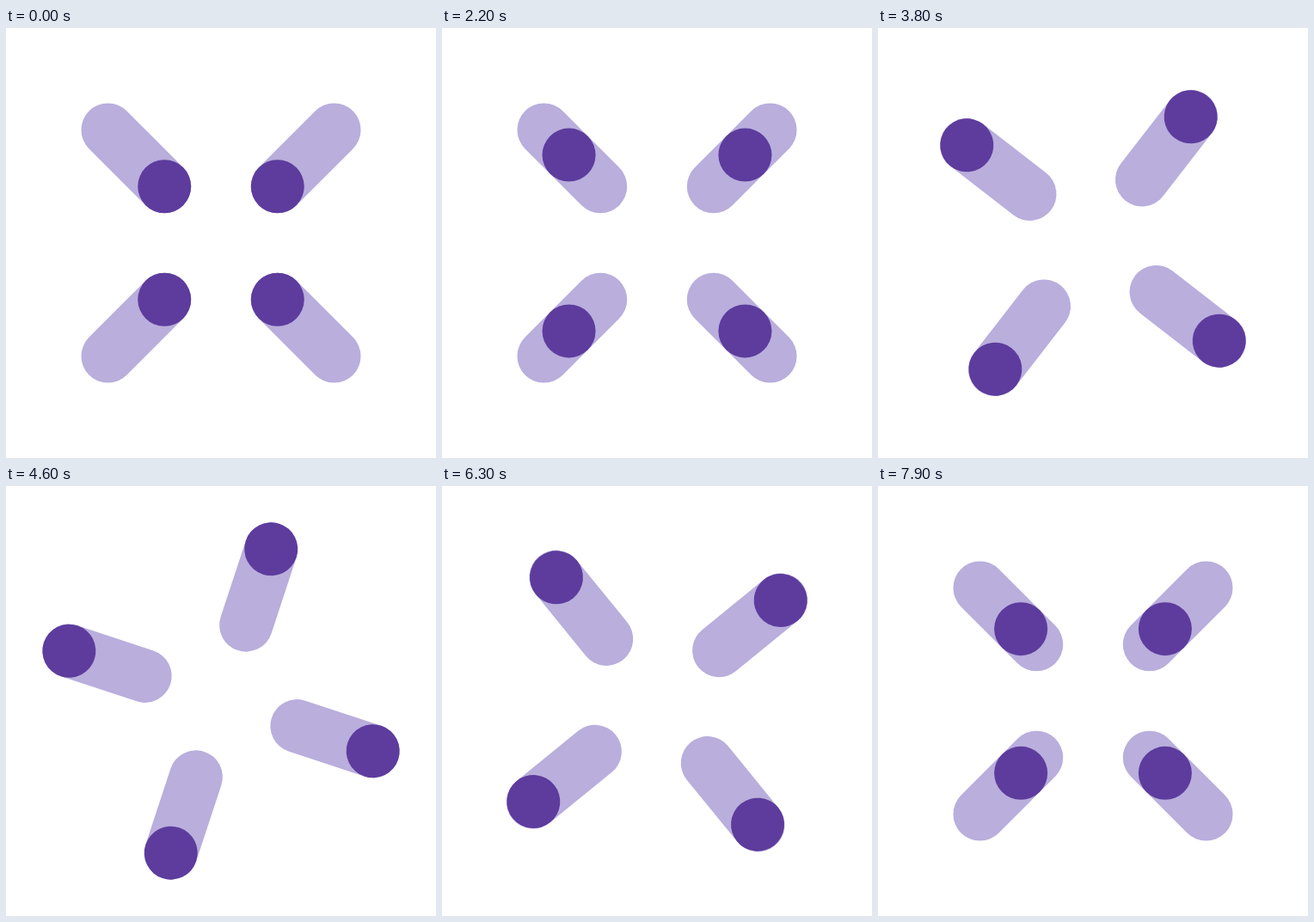
Animation of 500x500 px, one loop 8 s. Source, as an HTML page:

```html
<!DOCTYPE html>
<html lang="en">
<head>
<meta charset="utf-8">
<title>Sliding dots</title>
<style>
  html, body { margin: 0; width: 100%; height: 100%; overflow: hidden; background: #fff; }
  svg { display: block; width: 100vw; height: 100vh; }
  line { stroke: #b9aedc; stroke-width: 62; stroke-linecap: round; }
  circle { fill: #5d3c9d; }
</style>
</head>
<body>
<svg viewBox="-250 -250 500 500">
  <defs>
    <g id="arm">
      <line x1="93" x2="186"/>
      <circle id="dot" r="31"/>
    </g>
  </defs>
  <g id="wheel">
    <use href="#arm"/>
    <use href="#arm" transform="rotate(90)"/>
    <use href="#arm" transform="rotate(180)"/>
    <use href="#arm" transform="rotate(270)"/>
  </g>
</svg>
<script>
  const LOOP = 8000, STEP = 100;
  const INNER = 93, OUTER = 186;
  const dot = document.getElementById('dot');
  const wheel = document.getElementById('wheel');

  // Timing curve cubic-bezier(a, 0, b, 1), solved by bisection.
  function bezier(x, a, b) {
    let lo = 0, hi = 1;
    for (let i = 0; i < 30; i++) {
      const s = (lo + hi) / 2, r = 1 - s;
      if (3 * s * r * r * a + 3 * s * s * r * b + s * s * s < x) lo = s;
      else hi = s;
    }
    return lo * lo * (3 - 2 * lo);
  }

  function progress(t, start, duration, a, b) {
    const x = (t - start) / duration;
    return x <= 0 ? 0 : x >= 1 ? 1 : bezier(x, a, b);
  }

  function draw(t) {
    const out = progress(t, 0, 4000, 0.48, 0.57);
    const back = progress(t, 6000, 3230, 0.65, 0.35);
    const turn = progress(t, 2485, 5020, 0.646, 0.354);
    dot.setAttribute('cx', INNER + (OUTER - INNER) * (out - back));
    wheel.setAttribute('transform', `rotate(${45 - 90 * turn})`);
  }

  const begin = performance.now();
  function frame() {
    const t = (performance.now() - begin) % LOOP;
    draw(Math.floor(t / STEP) * STEP);
    requestAnimationFrame(frame);
  }
  frame();
</script>
</body>
</html>
```
